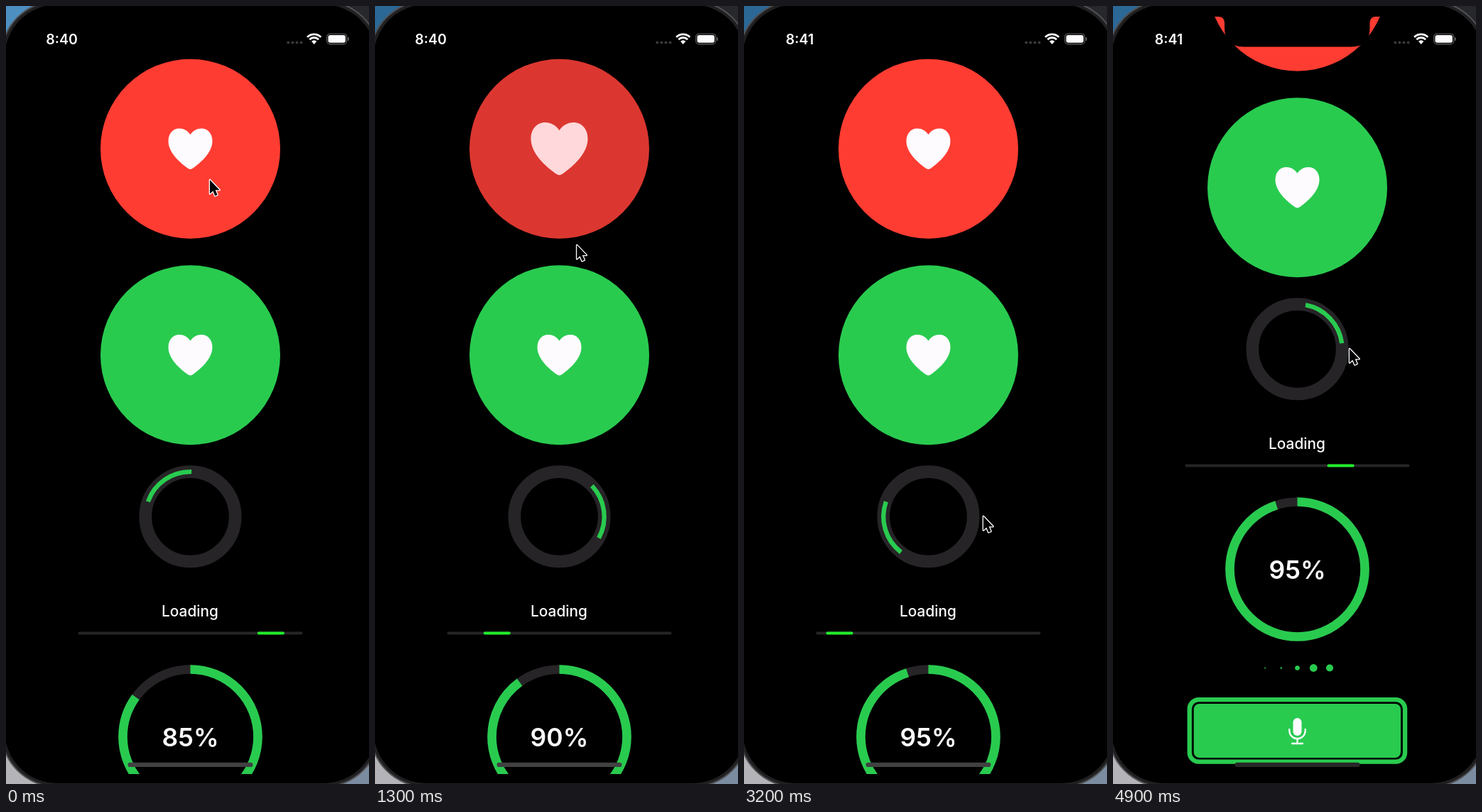
These frames come from a looping animation (511x1096 px, 5000 ms). An HTML page with a canvas:

```html
<!DOCTYPE html>
<html lang="en">
<head>
<meta charset="utf-8">
<title>Loading indicators</title>
<style>
  html, body { margin: 0; width: 100%; height: 100%; overflow: hidden; background: #000; }
  canvas { display: block; }
</style>
</head>
<body>
<canvas id="stage" width="511" height="1096"></canvas>
<script>
const ctx = document.getElementById('stage').getContext('2d');
const LOOP = 5000, STEP = 100, CX = 259.5, TAU = Math.PI * 2;
const RED = [255, 60, 50], GREEN = [41, 203, 79], WHITE = [253, 251, 254];
const DARK_GRAY = [39, 38, 41], MID_GRAY = [129, 129, 134];
const TRACK = '#262427';
const rgb = c => `rgb(${c.map(Math.round)})`;
const green = rgb(GREEN), white = rgb(WHITE);

const HEART = new Path2D(`M0-40C-7-51-19-57.5-31-57.5C-49-57.5-62-43-62-22
  C-62 10-30 38-8 54C-5 56-2 57.5 0 57.5C2 57.5 5 56 8 54
  C30 38 62 10 62-22C62-43 49-57.5 31-57.5C19-57.5 7-51 0-40Z`);
const ARROW = new Path2D('M0 0V19.5L4.4 15.5L7.3 22.4L10.6 21L7.7 14.2H13.6Z');
const NOTCH = new Path2D(`M143 0V15H148Q157 15 157 24V31Q157 57.5 184 57.5
  H335Q361.5 57.5 361.5 31V24Q361.5 15 370 15H376V0Z`);

// Keyframes are [time, value].
const SCROLL = [[3300, 0], [3700, 48], [4200, 138], [4900, 236]];
const CURSOR_X = [[0, 287], [1100, 287], [1600, 279], [1900, 279], [2500, 287], [3200, 337], [3700, 337], [4200, 333], [4900, 333]];
const CURSOR_Y = [[0, 245], [1100, 245], [1600, 506], [1900, 506], [2500, 557], [3200, 719], [3300, 719], [3700, 671], [4200, 577], [4900, 483]];

const clamp01 = v => Math.min(1, Math.max(0, v));
const smooth = v => { v = clamp01(v); return v * v * (3 - 2 * v); };

// Monotone cubic interpolation through keyframes.
function track(keys, t) {
  const last = keys.length - 1;
  if (t <= keys[0][0]) return keys[0][1];
  if (t >= keys[last][0]) return keys[last][1];
  const slope = k => (keys[k + 1][1] - keys[k][1]) / (keys[k + 1][0] - keys[k][0]);
  const tangent = k => {
    if (k === 0 || k === last) return slope(Math.min(k, last - 1));
    const a = slope(k - 1), b = slope(k);
    return a * b <= 0 ? 0 : 2 * a * b / (a + b);
  };
  let i = 0;
  while (t > keys[i + 1][0]) i++;
  const [t0, v0] = keys[i], [t1, v1] = keys[i + 1], span = t1 - t0;
  const u = (t - t0) / span, s = smooth(u);
  return v0 + (v1 - v0) * s
    + span * u * (1 - u) * (tangent(i) * (1 - u) - tangent(i + 1) * u);
}

// Colours blend in linear light.
const blend = (a, b, p) =>
  rgb(a.map((v, i) => (v ** 2.2 * (1 - p) + b[i] ** 2.2 * p) ** (1 / 2.2)));

function disc(x, y, r, color) {
  ctx.beginPath();
  ctx.arc(x, y, r, 0, TAU);
  ctx.fillStyle = color;
  ctx.fill();
}

function ring(y, r, width, color, from = 0, to = 1) {
  ctx.beginPath();
  ctx.arc(CX, y, r, (from - 0.25) * TAU, (to - 0.25) * TAU);
  ctx.lineWidth = width;
  ctx.strokeStyle = color;
  ctx.stroke();
}

function box(x, y, w, h, r, color, lineWidth = 0) {
  ctx.beginPath();
  ctx.roundRect(x, y, w, h, r);
  ctx.lineWidth = lineWidth;
  ctx.fillStyle = ctx.strokeStyle = color;
  lineWidth ? ctx.stroke() : ctx.fill();
}

function label(text, x, y, size, weight) {
  ctx.font = `${weight} ${size}px Inter, sans-serif`;
  ctx.textAlign = 'center';
  ctx.fillStyle = white;
  ctx.fillText(text, x, y);
}

function heartButton(t, y, color, pressedColor, onAt, offAt) {
  const p = smooth((t - onAt) / 350) - smooth((t - offAt) / 350);
  disc(CX, y, 126.5, blend(color, pressedColor, p));
  ctx.save();
  ctx.translate(CX, y);
  ctx.scale(0.5 + p / 2, 0.5 + p / 2);
  ctx.fillStyle = blend(WHITE, color, p);
  ctx.fill(HEART);
  ctx.restore();
}

function recordButton() {
  box(107.7, 1213.1, 303.4, 87.6, 13, green, 6.3);
  box(113.7, 1219, 291.3, 76, 8, green);
  box(253.5, 1239, 12, 25, 6, white);
  ctx.beginPath();
  ctx.moveTo(248.3, 1255);
  ctx.lineTo(248.3, 1257);
  ctx.arc(CX, 1257, 11.2, Math.PI, 0, true);
  ctx.lineTo(270.7, 1255);
  ctx.moveTo(CX, 1268);
  ctx.lineTo(CX, 1275);
  ctx.moveTo(252, 1275);
  ctx.lineTo(267, 1275);
  ctx.lineWidth = 2.3;
  ctx.lineCap = 'round';
  ctx.strokeStyle = white;
  ctx.stroke();
  ctx.lineCap = 'butt';
}

function content(t) {
  heartButton(t, 201.2, RED, DARK_GRAY, 475, 1075);
  heartButton(t, 491.7, GREEN, MID_GRAY, 1636, 2234);

  const turn = (1.5 + 0.09 * t) / 360;
  ring(719.3, 63.2, 17.7, TRACK);
  ring(719.3, 63.2, 6.3, green, turn - 0.2, turn);

  label('Loading', CX - 0.5, 860, 20.8, 500);
  box(101.5, 881.6, 316, 3.8, 1.9, TRACK);
  box(101.5 + 278 * ((0.908 + 0.000982 * t) % 1), 881.6, 38, 3.8, 1.9, '#21ee2b');

  const percent = t < 400 ? 85 : t < 2200 ? 90 : 95;
  ring(1029.5, 95, 12.6, TRACK);
  ring(1029.5, 95, 12.6, green, 0, percent / 100);
  label(percent + '%', CX, 1042.5, 35.5, 600);

  for (let i = 0; i < 5; i++) {
    const phase = ((t - 4215 - 200 * i) / 600 + 20) % 2;
    disc(CX + (i - 2) * 22.75, 1168.5, 6.3 * Math.abs(1 - phase), green);
  }
  recordButton();
}

function phoneFrame(t) {
  const corner = (x, y, color) => {
    ctx.fillStyle = color;
    ctx.fillRect(x, y, 60, 60);
  };
  corner(0, 0, t < 100 ? '#4d8fc0' : '#2c6896');
  corner(451, 0, '#26282c');
  corner(0, 1036, '#b4b4b8');
  corner(451, 1036, '#7b8ca0');
  box(-8, -8, 535, 1109, 80, '#515153');
  box(-6, -6, 531, 1105, 78, '#202022');
  box(-2, -2, 523, 1097, 74, '#000');
}

function statusBar(t) {
  label(t < 3100 ? '8:40' : '8:41', 78.5, 53.8, 19.5, 600);
  for (let i = 0; i < 4; i++) disc(397.3 + i * 6.1, 51.5, 2, '#39393b');

  ctx.strokeStyle = white;
  ctx.lineWidth = 2.8;
  for (const r of [9, 13.6]) {
    ctx.beginPath();
    ctx.arc(433.7, 53.5, r, -0.75 * Math.PI, -0.25 * Math.PI);
    ctx.stroke();
  }
  ctx.beginPath();
  ctx.moveTo(433.7, 54);
  ctx.arc(433.7, 53.5, 5.2, -0.75 * Math.PI, -0.25 * Math.PI);
  ctx.fillStyle = white;
  ctx.fill();

  box(451.7, 39.2, 28, 14.4, 4.4, '#68686a', 1.1);
  box(453.5, 41, 24.4, 10.8, 2.8, white);
  box(481, 44, 1.6, 5, 0.8, '#68686a');
}

function draw(t) {
  ctx.clearRect(0, 0, 511, 1096);
  phoneFrame(t);

  ctx.save();
  ctx.beginPath();
  ctx.rect(0, 15, 511, 1067);
  ctx.clip();
  ctx.translate(0, -track(SCROLL, t));
  content(t);
  ctx.restore();

  ctx.fillStyle = '#000';
  ctx.fill(NOTCH);
  statusBar(t);
  const shade = 65 - 26 * clamp01((t - 4200) / 700);
  box(171.5, 1065.8, 176, 6.3, 3.1, rgb([shade, shade, shade + 1]));

  ctx.save();
  ctx.translate(track(CURSOR_X, t), track(CURSOR_Y, t));
  ctx.lineJoin = 'round';
  ctx.lineWidth = 2.6;
  ctx.strokeStyle = '#fff';
  ctx.stroke(ARROW);
  ctx.fillStyle = '#000';
  ctx.fill(ARROW);
  ctx.restore();
}

function play() {
  const t = performance.now() % LOOP;
  draw(Math.floor(t / STEP) * STEP);
  requestAnimationFrame(play);
}
play();
</script>
</body>
</html>
```
